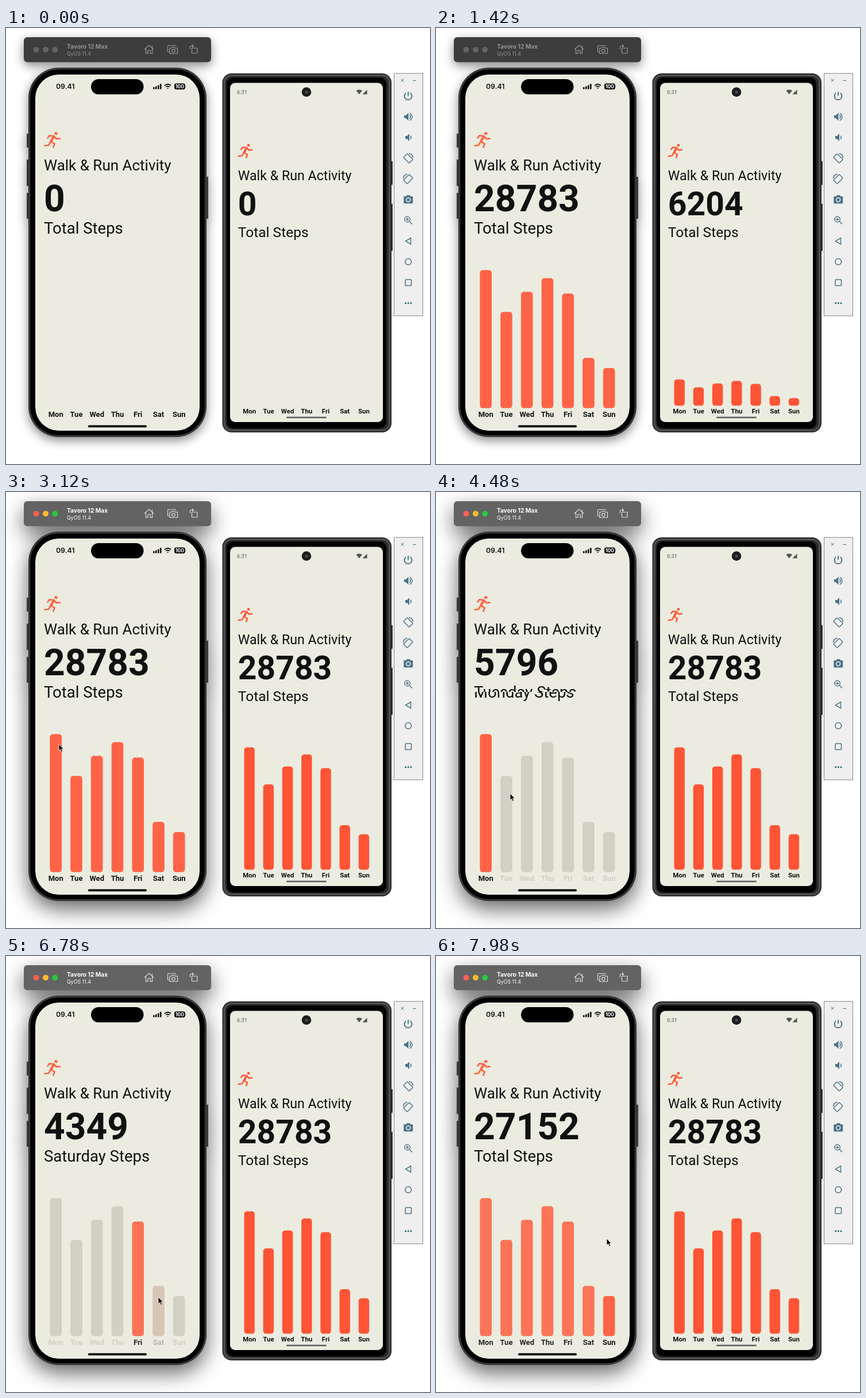
Animation, 738 px wide and 759 px high, one loop 8 s. Source, as an HTML page:

```html
<!DOCTYPE html>
<html lang="en">
<head>
<meta charset="utf-8">
<title>Step counter on two phones</title>
<style>
  html, body { margin: 0; width: 100%; height: 100%; overflow: hidden; background: #fff; }
  svg { display: block; }
  text { font-family: Roboto, sans-serif; fill: #111; }
  .bold { font-weight: 700; }
  .day { font-weight: 700; text-anchor: middle; }
  .ui { font-family: Inter, sans-serif; }
  .line { fill: none; stroke-width: 1.5; }
  .shadow { filter: drop-shadow(0 6px 9px #0007); }
  .bar { fill: #3d3d3d; }
  .title { fill: #929292; }
  .tools { stroke: #989898; stroke-width: 1.2; fill: none; }
  .dots { fill: #636363; }
  .on .shadow { filter: drop-shadow(0 14px 18px #0009); }
  .on .bar { fill: #636363; }
  .on .title { fill: #fff; }
  .on .tools { stroke: #dedede; }
  .on .dots :nth-child(1) { fill: #ff5f57; }
  .on .dots :nth-child(2) { fill: #febc2e; }
  .on .dots :nth-child(3) { fill: #28c840; }
</style>
</head>
<body>
<svg id="stage" width="738" height="759" viewBox="0 0 738 759">
  <defs>
    <g id="runner" fill="none" stroke="currentColor" stroke-width="2.7" stroke-linecap="round" stroke-linejoin="round">
      <circle cx="20.8" cy="3.6" r="2.7" fill="currentColor" stroke="none"/>
      <path d="M6.5 11.5 9.5 7.4 17 8 21.5 13.2 27.6 12.4M12.4 18 18.6 21.6 16.4 27.6M11.2 18.4 8.2 24 1.6 25"/>
      <path stroke-width="4.2" d="M16.6 9.6 12.6 17"/>
    </g>
    <g id="wifi" fill="none" stroke="#111" stroke-width="1.9">
      <path d="M-5.4-2.2Q0-7 5.4-2.2M-3.2.2Q0-2.6 3.2.2"/>
      <path d="M-1.5 2.1Q0 .9 1.5 2.1L0 3.9Z" fill="#111" stroke="none"/>
    </g>
    <clipPath id="upper"><path d="M51 330H337V348H51Z"/></clipPath>
    <clipPath id="lower"><path d="M51 348H337V370H51Z"/></clipPath>
  </defs>

  <!-- left device -->
  <g class="shadow">
    <rect class="bar" x="31" y="16" width="326" height="43.5" rx="6"/>
    <path d="M36 184h4v24h-4zM36 229h4v46h-4zM36 287h4v45h-4zM348 259h4v73h-4z" fill="#3a3a3a"/>
    <rect x="39" y="69" width="310" height="643" rx="53" fill="#2b2b2d"/>
  </g>
  <rect x="41" y="71" width="306" height="639" rx="51" stroke="#3a3a3c" stroke-width="2.5"/>
  <rect x="51" y="81" width="286" height="620" rx="41" fill="#ebecdf"/>
  <g class="dots"><circle cx="52.5" cy="37.7" r="5"/><circle cx="69" cy="37.7" r="5"/><circle cx="85.3" cy="37.7" r="5"/></g>
  <text class="ui title bold" x="106" y="36" font-size="10.2">Tavoro 12 Max</text>
  <text class="ui title" x="106" y="47.5" font-size="8.8">QyOS 11.4</text>
  <g class="tools">
    <path d="M241 37.5 249 30 257 37.5M243.5 36V44.5H247V39H251V44.5H254.5V36M254.5 34V31"/>
    <path d="M284.5 42H283Q281.5 42 281.5 40.5V32Q281.5 30.5 283 30.5H294Q295.5 30.5 295.5 32"/>
    <path d="M285 35H288L289 33.5H293.5L294.5 35H298.5V44.5H285Z"/><circle cx="291.5" cy="39.6" r="2.7"/>
    <rect x="323.5" y="35" width="9.5" height="9" rx="1"/><path d="M320.5 37V33Q320.5 31.5 322 31.5H326M324 29 326.5 31.5 324 34"/>
  </g>
  <rect x="148" y="89" width="91.5" height="26.5" rx="13.2"/>
  <text class="ui" x="87" y="106.4" font-size="12.3" font-weight="600">09.41</text>
  <path d="M256 103h2.6v3.5h-2.6zM260 101.5h2.6v5h-2.6zM264 99.5h2.6v7h-2.6zM268 97.2h2.6v9.3h-2.6z" fill="#111"/>
  <use href="#wifi" x="281.6" y="102.4"/>
  <rect x="293" y="96.5" width="18.8" height="10.5" rx="3.2" fill="#111"/><path d="M312.7 100v3.5" stroke="#999"/>
  <text class="ui bold" x="302.4" y="104.9" font-size="8.4" text-anchor="middle" style="fill:#fff">100</text>
  <use href="#runner" x="66" y="180" color="#ff6347"/>
  <text x="66" y="248" font-size="26">Walk &amp; Run Activity</text>
  <text id="countL" class="bold" x="66" y="319" font-size="64">0</text>
  <text id="capTop" x="66" y="358" font-size="27.5" clip-path="url(#upper)"></text>
  <text id="capLow" x="66" y="358" font-size="27.5" clip-path="url(#lower)"></text>
  <g id="chartL"></g>
  <rect x="143" y="691.5" width="102" height="3.8" rx="1.9"/>

  <!-- right device -->
  <path d="M669 232h4v41h-4zM669 306h4v82h-4z" fill="#2c2c2c"/>
  <rect x="376.5" y="79" width="294.5" height="625" rx="16" fill="#2a2a2a"/>
  <rect x="380" y="82.500" width="287.500" height="618" rx="13" fill="none" stroke="#505050" stroke-width="3"/>
  <rect x="384" y="86" width="278" height="611" rx="12"/>
  <rect x="390" y="95.5" width="266" height="590.5" rx="9" fill="#ebecdf"/>
  <circle cx="523" cy="111.5" r="8.3" fill="#1d1d1d"/><circle cx="523" cy="111.5" r="2.6" fill="#4a4a50"/>
  <text x="402" y="115.2" font-size="9.3" style="fill:#5c5c58">6:31</text>
  <path d="M609.5 109Q614.7 105.5 620 109L614.7 115.5ZM620.5 115.5H628.5V107.5Z" fill="#55554f"/>
  <use href="#runner" transform="translate(403.5 201) scale(.89)" color="#ff5436"/>
  <text x="403.8" y="265" font-size="23.2">Walk &amp; Run Activity</text>
  <text id="countR" class="bold" x="403.8" y="325.5" font-size="57">0</text>
  <text x="403.8" y="364" font-size="24.5">Total Steps</text>
  <g id="chartR"></g>
  <rect x="488" y="676.8" width="70" height="2.5" rx="1.2" fill="#5a5a55"/>

  <!-- side toolbar -->
  <rect x="675.5" y="79" width="50" height="422" fill="#efefef" stroke="#858585"/>
  <g class="line" stroke="#4b7484">
    <path stroke-width="1" d="M687.5 88.5l5 5m0-5l-5 5M708 91.5h6"/>
    <path stroke-width="1.9" d="M700 111V118M696.2 113.2A6.5 6.5 0 1 0 703.8 113.2"/>
    <path fill="#4b7484" stroke="none" d="M693 152h3l4.5-4.5v14L696 157h-3zM695 188h3l4-4v13l-4-4h-3z"/>
    <path d="M702.5 151q3 3.5 0 7M703 148q8 6.5 0 13M704 187.5q2.5 3 0 6"/>
    <g id="turn" transform="translate(700 227)">
      <rect x="-4.5" y="-7" width="9" height="14" rx="1" transform="rotate(-45)"/>
      <path d="M1.5-8.5Q8-7.5 8.5-1"/>
    </g>
    <use href="#turn" transform="translate(1400 36) scale(-1 1)"/>
    <path fill="#4b7484" stroke="none" d="M693.5 293h3l1.5-2h4.500l1.5 2h3q1.200 0 1.200 1.200v10q0 1.200-1.200 1.200h-13.500q-1.200 0-1.200-1.200v-10q0-1.200 1.200-1.200z"/>
    <circle cx="700.2" cy="299" r="3.4" stroke="#efefef"/>
    <circle cx="698.5" cy="333" r="4.7"/><path d="M702 336.5l5 5M696 333h5m-2.5-2.5v5"/>
    <path d="M704.5 365.5V376.5L695.5 371Z"/><circle cx="700.2" cy="407" r="5.4"/>
    <rect x="695" y="438" width="10.5" height="10.5" rx="1"/>
    <path stroke-width="3.4" stroke-linecap="round" d="M695.5 479h0M700.2 479h0M705 479h0"/>
  </g>
  <path id="cursor" d="M0 0V11.5L2.7 9 4.7 13.5 6.7 12.6 4.8 8.3H8.4Z" stroke="#fff" stroke-width=".8"/>
</svg>
<script>
const LOOP = 8000, FOCUS = 3040, START_L = 60, START_R = 1180, GROW = 1000, COUNT = 300, TINT = 350;
const steps = [5796, 4040, 4887, 5458, 4810, 2112, 1680];
const total = steps.reduce((a, b) => a + b);
const names = ['Monday', 'Tuesday', 'Wednesday', 'Thursday', 'Friday', 'Saturday', 'Sunday'];
// [time, selected day], -1 selects the whole week
const taps = [[3600, 0], [4480, 1], [5060, 2], [5600, 3], [6080, 4], [6715, 5], [7280, 6], [7770, -1]];
// [time, x, y]
const path = [
  [2460, 150, 388], [2500, 135, 394], [2820, 112, 413], [2960, 112, 413], [3120, 92, 439], [3280, 90, 442],
  [3900, 90, 442], [4300, 129, 525], [4700, 129, 525], [4880, 164, 545], [5180, 164, 545], [5380, 200, 555],
  [5580, 200, 555], [5720, 235, 562], [6420, 235, 562], [6600, 265, 594], [6860, 265, 594], [7080, 297, 492]
];

const $ = id => document.getElementById(id);
const clamp = v => Math.min(1, Math.max(0, v));
const mix = (a, b, p) => a + (b - a) * p;
const smooth = p => p * p * (3 - 2 * p);

// cubic-bezier(.4, 0, .2, 1)
function ease(x) {
  if (x <= 0 || x >= 1) return clamp(x);
  let lo = 0, hi = 1, u;
  for (let i = 0; i < 24; i++) {
    u = (lo + hi) / 2;
    const bx = 1.2 * u * (1 - u) ** 2 + .6 * u * u * (1 - u) + u ** 3;
    if (bx < x) lo = u; else hi = u;
  }
  return smooth(u);
}

function makeChart(id, x, gap, width, base, full, color, labelY, size) {
  const root = $(id);
  root.innerHTML = names.map((name, i) =>
    `<rect x="${x + gap * i - width / 2}" width="${width}" rx="5"/>` +
    `<text class="day" x="${x + gap * i}" y="${labelY}" font-size="${size}">${name.slice(0, 3)}</text>`).join('');
  const bars = root.querySelectorAll('rect'), labels = root.querySelectorAll('text');
  return (grow, lit) => bars.forEach((bar, i) => {
    const h = steps[i] / steps[0] * full * grow, on = lit(i) * 100;
    bar.setAttribute('y', base - h);
    bar.setAttribute('height', h);
    bar.style.fill = `color-mix(in oklab, ${color} ${on}%, #d0d0c3)`;
    labels[i].style.fill = `color-mix(in oklab, #111 ${on}%, #d0d0c3)`;
  });
}
const drawL = makeChart('chartL', 86.7, 35.75, 20.6, 661.7, 240.2, '#ff6347', 676.6, 13);
const drawR = makeChart('chartR', 423.7, 33.2, 18.4, 657.6, 213.2, '#ff5436', 670.6, 11.5);

const valueOf = day => day < 0 ? total : steps[day];
const caption = day => (day < 0 ? 'Total' : names[day]) + ' Steps';
const isLit = (day, i) => day < 0 || day === i ? 1 : 0;

function drawCursor(t) {
  const k = path.findLastIndex(p => p[0] <= t);
  $('cursor').style.display = k < 0 ? 'none' : '';
  if (k < 0) return;
  const a = path[k], b = path[k + 1] || a;
  const p = b === a ? 0 : smooth((t - a[0]) / (b[0] - a[0]));
  $('cursor').setAttribute('transform', `translate(${mix(a[1], b[1], p)} ${mix(a[2], b[2], p)})`);
}

function draw(t) {
  const k = taps.findLastIndex(tap => tap[0] <= t);
  const now = k < 0 ? -1 : taps[k][1], before = k < 1 ? -1 : taps[k - 1][1];
  const age = k < 0 ? Infinity : t - taps[k][0];
  const growL = ease((t - START_L) / GROW), growR = ease((t - START_R) / GROW);
  const tint = ease(age / TINT);

  $('stage').classList.toggle('on', t >= FOCUS);
  $('countL').textContent = Math.round(growL * mix(valueOf(before), valueOf(now), ease(age / COUNT)));
  $('countR').textContent = Math.round(growR * total);
  // the lower half of the caption lags by one refresh
  $('capTop').textContent = caption(now);
  $('capLow').textContent = caption(age < 20 ? before : now);
  drawL(growL, i => mix(isLit(before, i), isLit(now, i), tint));
  drawR(growR, () => 1);
  drawCursor(t);
}

const began = performance.now();
function tick() {
  draw((performance.now() - began) % LOOP);
  requestAnimationFrame(tick);
}
tick();
</script>
</body>
</html>
```
